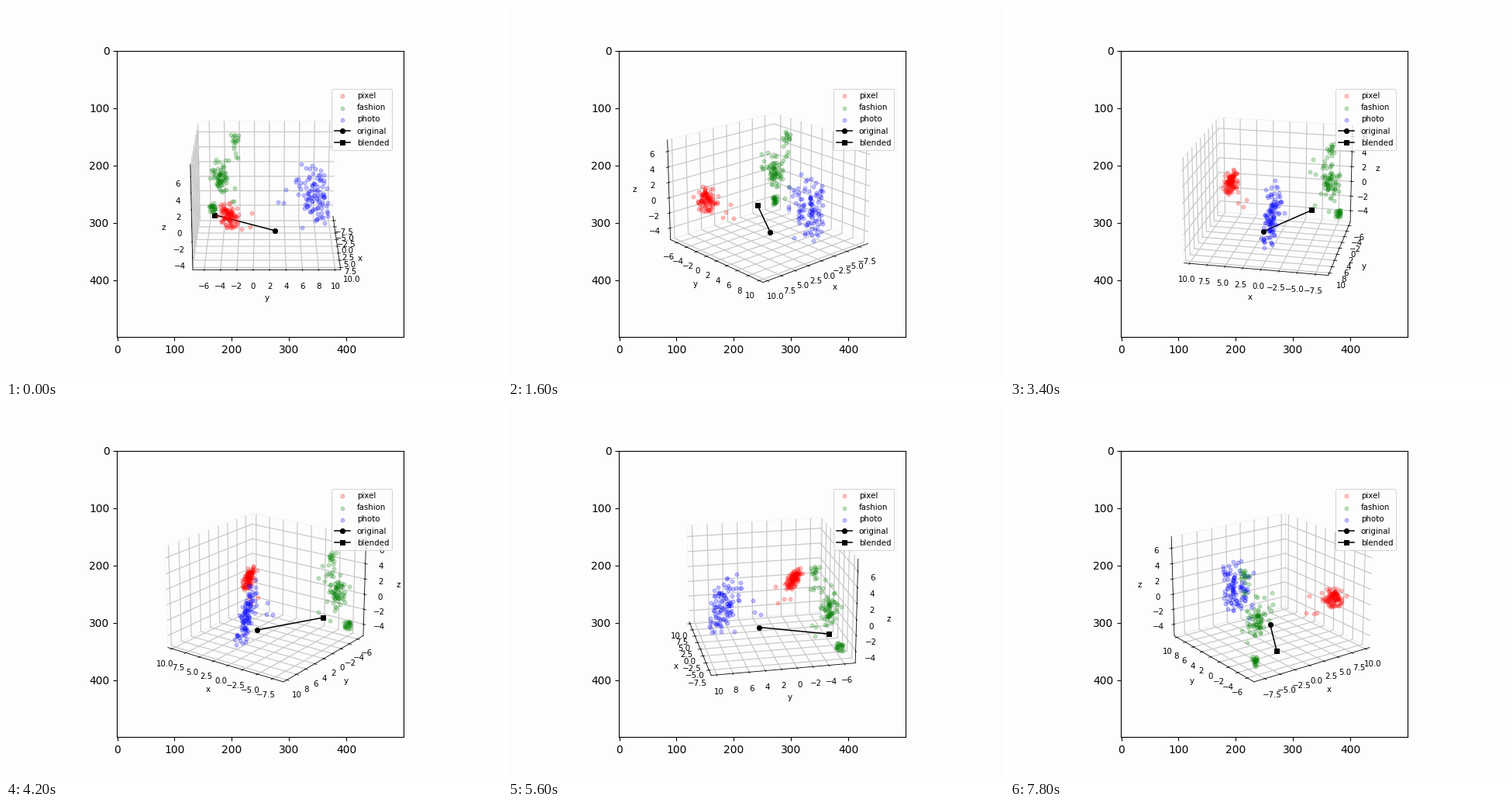
Write a matplotlib script that moves like this. It is 640x480 px and loops after 8 s.

```python
import matplotlib as mpl
import matplotlib.pyplot as plt
import numpy as np
from matplotlib.animation import FuncAnimation

W, H = 640, 480
SIDE = 369.6            # side of the square panel in pixels
LEFT, BOTTOM = 143.2, 52.8
K = SIDE / 500          # scale of the 500 px plot shown in the panel
FRAMES, STEP = 40, 6

MID = np.array([0.745, 1.647, 0.95])
SPAN = np.array([20.03, 18.09, 13.02])
BOX = np.array([1.19, 1.19, 0.893])   # size of the plot box as projected

plt.rcParams.update({"figure.facecolor": "#fdfdfd", "axes.facecolor": "#fdfdfd"})
rng = np.random.default_rng(11)


def blob(n, mean, sd, r=0):
    """Normal cloud in box units; r is the correlation of every axis pair."""
    cov = np.full((3, 3), float(r))
    np.fill_diagonal(cov, 1)
    g = rng.multivariate_normal(np.zeros(3), cov, n)
    return mean + np.clip(g, -2.3, 2.3) * sd


def to_data(*parts):
    p = np.clip(np.vstack(parts), -0.436 * BOX, 0.436 * BOX)
    return (MID + p / BOX * SPAN).T


pixel = to_data(
    blob(95, (0.43, -0.315, -0.045), (0.036, 0.036, 0.048), -0.35),
    blob(6, (0.35, -0.23, -0.12), (0.05, 0.07, 0.16)),
)
fashion = to_data(
    blob(17, (-0.465, -0.275, 0.30), (0.018, 0.017, 0.06)),
    blob(55, (-0.435, -0.41, -0.035), (0.037, 0.037, 0.065)),
    blob(22, (-0.50, -0.485, -0.333), (0.016, 0.018, 0.028)),
    blob(12, (-0.40, -0.35, -0.03), (0.06, 0.06, 0.12)),
)
photo = to_data(
    blob(100, (-0.088, 0.40, -0.05), (0.037, 0.068, 0.12), -0.4),
    blob(3, (-0.09, 0.16, -0.07), (0.03, 0.03, 0.08)),
)
link = to_data([(0.047, 0.072, -0.328), (-0.272, -0.455, -0.308)])

fig = plt.figure(figsize=(W / 100, H / 100), dpi=100)

panel = fig.add_axes([LEFT / W, BOTTOM / H, SIDE / W, SIDE / H])
panel.set(xlim=(-0.5, 499.5), ylim=(499.5, -0.5),
          xticks=range(0, 500, 100), yticks=range(0, 500, 100))

small = {
    "font.size": 10 * K,
    "lines.linewidth": 1.5 * K,
    "lines.markersize": 6 * K,
    "lines.markeredgewidth": K,
    "patch.linewidth": K,
    "axes.linewidth": 0.8 * K,
    "grid.linewidth": 1.2 * K,
    "grid.color": "#c8c8c8",
    "xtick.major.width": 0.8 * K,
    "ytick.major.width": 0.8 * K,
}
with mpl.rc_context(small):
    ax = fig.add_axes([(LEFT + 0.125 * SIDE) / W, (BOTTOM + 0.11 * SIDE) / H,
                       0.775 * SIDE / W, 0.77 * SIDE / H], projection="3d")
    ax.patch.set_visible(False)

    clouds = ((pixel, "red", "pixel"), (fashion, "green", "fashion"),
              (photo, "blue", "photo"))
    for pts, color, name in clouds:
        ax.scatter(*pts, s=20 * K * K, color=color, alpha=0.22, label=name,
                   linewidths=1.5 * K, depthshade=False)
    for p, mark, name in zip(link.T, "os", ("original", "blended")):
        ax.plot(*p[:, None], color="black", marker=mark, label=name)
    ax.plot(*link, color="black")

    lo, hi = MID - SPAN / 2, MID + SPAN / 2
    ax.set(xlim=(lo[0], hi[0]), ylim=(lo[1], hi[1]), zlim=(lo[2], hi[2]))
    ax.set_xticks(np.arange(-7.5, 10.1, 2.5))
    ax.set_yticks(np.arange(-6, 11, 2))
    ax.set_zticks(np.arange(-4, 7, 2))
    ax.tick_params(labelsize=10 * K, pad=11.5 * K - 8)

    for axis, name in ((ax.xaxis, "x"), (ax.yaxis, "y"), (ax.zaxis, "z")):
        axis.pane.set_fill(False)
        axis.set_label_text(name)
        axis.labelpad = 25 * K - 21
        axis.label.set_clip_box(panel.bbox)
        axis.label.set_clip_on(True)

    ax.legend(loc="upper right", bbox_to_anchor=(1.1, 1))


def update(i):
    # a hair off the axis keeps the wall choice stable when seen head-on
    ax.view_init(elev=20, azim=STEP * i + 0.01)
    return []


anim = FuncAnimation(fig, update, frames=FRAMES, interval=200,
                     repeat=True, repeat_delay=0, blit=False)
plt.show()
```
